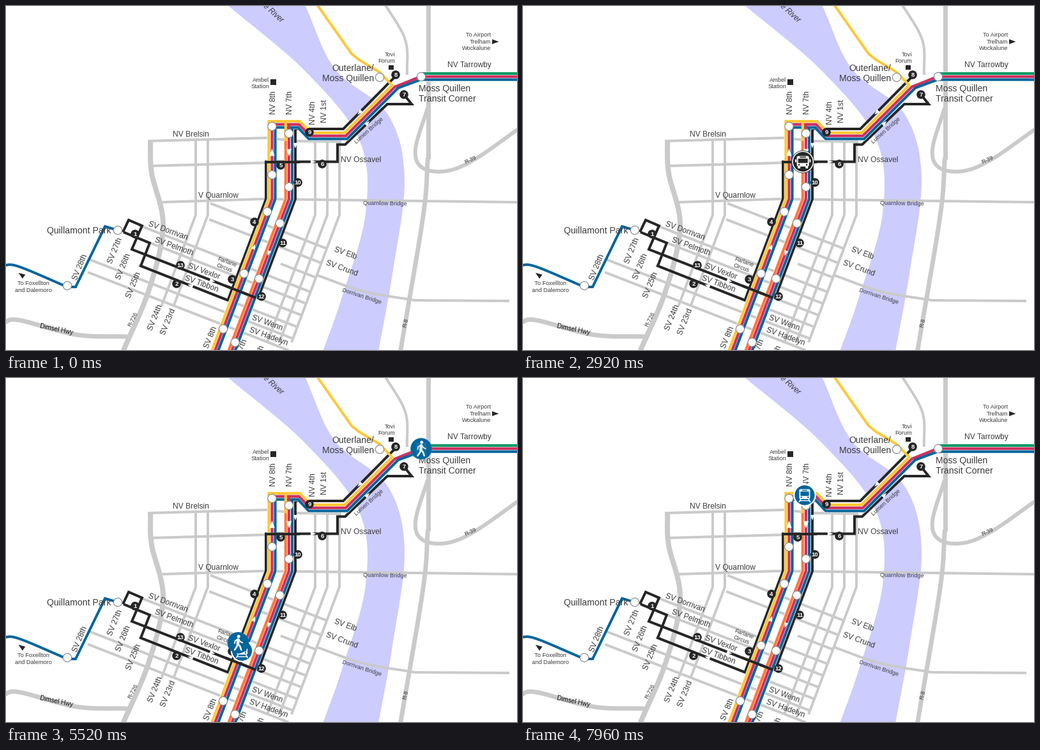
Recreate the animation shown at these times as a matplotlib script. Size 800 px wide and 540 px high, loop 8000 ms.

```python
import matplotlib.pyplot as plt
import numpy as np
from matplotlib.animation import FuncAnimation
from matplotlib.colors import to_rgb
from matplotlib.patches import Circle, FancyBboxPatch, Polygon, Rectangle
from matplotlib.transforms import Affine2D

W, H, DPI = 800, 540, 100
LOOP, STEP = 8000, 40
PX = 72 / DPI

RIVER, ROAD, INK, BLACK = "#ccccff", "#cacaca", "#3c3c3c", "#262626"
BLUE, RED, YELLOW = "#00659c", "#cf3060", "#ffc833"
ORANGE, GREEN, MIX = "#ff7a38", "#009a63", "#5d5c90"

BEND, LEAN, FALL = 303, 0.375, 0.39  # street geometry south of the bend

plt.rcParams["font.family"] = "Liberation Sans"
fig = plt.figure(figsize=(W / DPI, H / DPI), dpi=DPI, facecolor="white")
ax = fig.add_axes([0, 0, 1, 1])
ax.set_xlim(0, W)
ax.set_ylim(H, 0)
ax.axis("off")


# --- geometry
def smooth(pts, n=12):
    """Catmull-Rom curve through the points."""
    p = np.array(pts, float)
    p = np.vstack([2 * p[0] - p[1], p, 2 * p[-1] - p[-2]])
    u = np.linspace(0, 1, n, endpoint=False)[:, None]
    out = []
    for a, b, c, d in zip(p, p[1:], p[2:], p[3:]):
        out.append(0.5 * (2 * b + (c - a) * u + (2 * a - 5 * b + 4 * c - d) * u**2
                          + (3 * b - a - 3 * c + d) * u**3))
    return np.vstack(out + [p[-2:-1]])


def on_avenue(x, y, bend=BEND):
    """Point at height y on an avenue that leans west below the bend."""
    return x - LEAN * max(0, y - bend), y


def avenue(x, top, bottom, bend=BEND):
    return [(x, top), (x, bend), on_avenue(x, bottom, bend)]


def cross_y(k, x):
    """Height of the k-th cross street at x."""
    return 346 + (26 if k < 3 else 21) * (k - 3) + FALL * (x - 213)


def cross_end(k):
    """Where the k-th cross street meets the easternmost avenue."""
    x = (522 + LEAN * (328 - cross_y(k, 0))) / (1 + LEAN * FALL)
    return x, cross_y(k, x)


def travel(path, dist):
    p = np.array(path, float)
    run = np.r_[0, np.cumsum(np.hypot(*np.diff(p, axis=0).T))]
    return np.interp(dist, run, p[:, 0]), np.interp(dist, run, p[:, 1])


# --- drawing helpers
def line(pts, color=ROAD, width=4, z=2):
    p = np.array(pts, float)
    ax.plot(p[:, 0], p[:, 1], color=color, lw=width * PX, zorder=z,
            solid_capstyle="butt", solid_joinstyle="miter")


def label(text, x, y, size=12, rot=0, ha="center", color=INK, **font):
    ax.text(x, y, text, fontsize=size * PX, rotation=rot, ha=ha, va="center",
            rotation_mode="anchor", color=color, zorder=8, **font)


def block(lines, x, y, size, ha):
    for i, text in enumerate(lines):
        label(text, x, y + 1.12 * size * i, size, ha=ha)


def arrow(x, y, deg, size=4.5, color="white"):
    tri = np.array([(1, 0), (-0.9, 0.7), (-0.9, -0.7)]) * size
    spin = Affine2D().rotate_deg(deg).translate(x, y)
    ax.add_patch(Polygon(spin.transform(tri), fc=color, ec="none", zorder=7))


def arrow_on(a, b, part):
    (x0, y0), (x1, y1) = a, b
    arrow(x0 + part * (x1 - x0), y0 + part * (y1 - y0),
          np.degrees(np.arctan2(y1 - y0, x1 - x0)))


# --- river and roads
west = smooth([(346, -2), (468, 102), (553, 210), (563, 325), (525, 460), (496, 542)])
east = smooth([(468, -2), (515, 99), (597, 169), (624, 270), (605, 420), (583, 542)])
ax.add_patch(Polygon(np.vstack([west, east[::-1]]), fc=RIVER, ec="none", zorder=1))

line([(660.5, -5), (660.5, 240)], width=7)
line(smooth([(660.5, 238), (653, 330), (617, 545)]), width=7)
line(smooth([(592, -5), (625, 53), (628, 108)]))
line(smooth([(660, 160), (641, 225), (652, 254), (690, 259), (735, 240), (805, 191)]),
     width=6)
line(smooth([(226, 211), (228, 262), (246, 345), (224, 445), (182, 545)]), width=8)
line(smooth([(-5, 498), (20, 493), (110, 516), (190, 519)]), width=7)
line(smooth([(488, 423), (560, 448), (640, 462)]))
line([(640, 462), (788, 463)])

line([(222, 212), (408, 207), (455, 212), (525, 213)])
line([(228, 251), (410, 246)])
line([(243, 308), (400, 303), (800, 308)])
for x in (297, 316):
    line(avenue(x, 210, 471, 328))
for x in (484, 503, 522):
    line(avenue(x, 213, 528, 328))
for k, x in enumerate([320, 318, 430] + [208] * 4 + [128] * 2):
    line([(x, cross_y(k, x)), cross_end(k)])

# --- bus loop
south, north = on_avenue(407, 462), (407, 244.5)
bridge = [(519, 244.5), (519, 217.5), (531, 217.5), (597, 154), (635, 154)]
line([(183, 355), (192, 336), (213, 345), (197, 382), (391, 458)], BLACK, z=3)
line([(184, 355), (225, 372), (211, 408), south, (407, BEND), north]
     + bridge + [(623, 139)], BLACK, z=3)
line([(613, 107), (528, 193)] + avenue(453, 193, 460), BLACK, z=3)
line([(343, 439), (391, 458)], BLACK, z=6)
line([north, (460, 244.5)], BLACK, z=6)

# --- rail lines: parallel tracks, numbered from the outside in
GAP = 4.8


def bridge_track(k):
    y, run = 181 + GAP * k, 74 + 3 * k
    pts = avenue(411.5 + 5 * k, y, 560)[::-1]
    pts += [(460 - 1.5 * k, y), (478 - 2 * k, y + 18), (530 + 2 * k, y + 18),
            (530 + 2 * k + run, y + 18 - run)]
    return pts + (east_track(k) if k else [])


def east_track(k):
    return [(649, 106 + GAP * k), (W + 5, 106 + GAP * k)]


rails = [(c, bridge_track(k)) for k, c in enumerate([YELLOW, RED, BLUE])]
rails += [(c, avenue(437.8 + 5.1 * k, 181 + GAP * k, 560))
          for k, c in enumerate([ORANGE, RED, BLUE])]
rails.append((GREEN, east_track(0)))
for color, pts in rails:
    line(pts, "white", 5.6, 4)
for color, pts in rails:
    line(pts, color, 4.2, 5)
line([(437.8, 179), (437.8, 212)], YELLOW, 4.2, 5)
line([(485, -5), (541, 75), (552, 84), (585, 104), (606, 126)], YELLOW, z=3)
line(np.vstack([smooth([(-5, 407), (20, 409), (96, 441)]),
                [(109, 441), (155, 346), (175, 352)]]), BLUE, z=3)

# --- direction arrows, stops and numbered badges
SIXTH, FIFTH = 416.5, 443
arrow(SIXTH, 230, -90, 6)
arrow(FIFTH, 230, 90, 6)
arrow(453, 219, 90)
arrow(*on_avenue(SIXTH, 378), -70)
arrow(*on_avenue(FIFTH, 388), 110)
arrow_on(north, bridge[0], 0.66)
arrow_on((613, 107), (528, 193), 0.7)
arrow_on(bridge[2], bridge[3], 0.53)
arrow_on(south, (211, 408), 0.43)
arrow_on((197, 382), (391, 458), 0.65)

stops = [on_avenue(SIXTH, y) for y in (189, 265, 323, 420, 507)]
stops += [on_avenue(FIFTH, y) for y in (200, 284, 341, 428, 528)]
stops += [(175, 352), (96, 439), (585, 112), (650, 111)]
for spot in stops:
    ax.add_patch(Circle(spot, 6.6, fc="white", ec="#8c8c94", lw=1.2 * PX, zorder=7))

badges = [(202, 358), (267, 436), (354, 429), (389, 339), (430, 250), (495, 248),
          (623, 139), (610, 108), (475, 198), (457, 277), (433, 372), (400, 456),
          (273, 407)]
for n, (x, y) in enumerate(badges, 1):
    ax.add_patch(Circle((x, y), 6.8, fc=BLACK, ec="none", zorder=7))
    label(str(n), x, y + 0.3, 9.5, color="white", weight="bold")

# --- labels
for k, (name, x) in enumerate([("Dorrivan", 254), ("Pelmoth", 263), ("Vexlor", 310),
                               ("Tibbon", 306), ("Wenn", 409), ("Hadelyn", 411)], 3):
    label("SV " + name, x, cross_y(k, x) - 9, rot=-20)
for k, name in enumerate(["Elb", "Crund"]):
    label("SV " + name, 531 - 5 * k, cross_y(k, 531 - 5 * k) - 4, rot=-20)
for name, x, y in [("28th", 116, 410), ("27th", 171, 384), ("26th", 184, 409),
                   ("25th", 200, 438), ("24th", 234, 489), ("23rd", 254, 496),
                   ("8th", 321, 520), ("7th", 368, 540), ("4th", 395, 550)]:
    label("SV " + name, x, y, rot=68)
for name, x, y in [("8th", 419, 152), ("7th", 445, 152), ("4th", 481, 168),
                   ("1st", 499, 165)]:
    label("NV " + name, x, y, rot=90)
for text, x, y in [("NV Brelsin", 289, 202), ("NV Ossavel", 556, 242),
                   ("V Quarnlow", 332, 298), ("NV Tarrowby", 725, 93)]:
    label(text, x, y)
for text, x, y, rot in [("Quarnlow Bridge", 593, 310, -1), ("Lumen Bridge", 568, 195, 42),
                        ("Dorrivan Bridge", 557, 456, -18), ("Farlane", 346, 402, -20),
                        ("Circus", 342, 411, -20), ("R-39", 727, 242, 25),
                        ("R-8", 626, 497, 76), ("R-726", 199, 492, 63)]:
    label(text, x, y, 9.2, rot)
label("Dimsel Hwy", 79, 508, 10, -12, color="#111111")
label("e River", 418, 11, 12, -42, style="italic")

block(["Outerlane/", "Moss Quillen"], 576, 98, 14, "right")
block(["Moss Quillen", "Transit Corner"], 646, 130, 14, "left")
block(["Quillamont Park"], 164, 353, 14, "right")
block(["Tovi", "Forum"], 609, 76.5, 9.2, "right")
block(["Ambel", "Station"], 412, 116.5, 9.2, "right")
block(["To Airport", "Trelham", "Wockalune"], 759, 46, 9.2, "right")
block(["To Foxellton", "and Dalemoro"], 43, 436, 9.2, "center")

ax.add_patch(Rectangle((414, 115), 9, 9, fc=BLACK, zorder=7))
ax.add_patch(Rectangle((599, 93), 8, 7, fc=BLACK, zorder=7))
arrow(766, 56, 0, 5.5, BLACK)
arrow(24, 422, 215, 5.5, BLACK)


# --- moving icons
def box(w, h, y, color, r=0.7, x=0):
    """Rounded box centred on x with its top at y."""
    return FancyBboxPatch((x - w / 2 + r, y + r), w - 2 * r, h - 2 * r,
                          boxstyle=f"round,pad={r}", fc=color, ec="none")


def dot(x, y, r, color):
    return Circle((x, y), r, fc=color, ec="none")


def stroke(pts, width):
    return Polygon(pts, closed=False, fill=False, ec="white", lw=width * PX,
                   capstyle="round", joinstyle="round")


def bus_glyph(c):
    parts = [box(19, 16.5, -9, "white", 2.5), box(10, 1.6, -8, c), box(15.2, 7, -5, c)]
    for s in (-1, 1):
        parts += [dot(6 * s, 4.7, 1.3, c), box(4, 3.5, 7, "white", x=6 * s),
                  box(2, 5, -4, "white", x=11.2 * s)]
    return parts


def tram_glyph(c):
    parts = [box(17, 15.5, -9.5, "white", 2), box(8, 1.5, -8.3, c), box(13.4, 7, -5.8, c),
             stroke([(-7, 8.4), (7, 8.4)], 1.4)]
    for s in (-1, 1):
        parts += [dot(5.4 * s, 3.3, 1.2, c), stroke([(6.5 * s, 7), (8.5 * s, 10.5)], 1.8)]
    return parts


def walk_glyph(c):
    return [dot(0.8, -10, 2.5, "white"), stroke([(0, -5), (-0.5, 2)], 4.6),
            stroke([(-0.5, 2), (-2, 6), (-5.5, 11)], 2.6),
            stroke([(0, 2), (3, 5.5), (4.8, 11)], 2.6),
            stroke([(-1, -5.5), (-4.8, -3), (-5.5, 1)], 1.9),
            stroke([(1, -5.5), (3.5, -1.8), (7, 0)], 1.9)]


class Icon:
    def __init__(self, glyph, color, z, radius=16.8, ring=(16.2, 0)):
        self.shift = Affine2D()
        self.disc = dot(0, 0, radius, color)
        self.ring = Circle((0, 0), ring[0], fill=False, ec="white", lw=ring[1] * PX)
        self.glyph = glyph(color)
        self.parts = [self.disc, self.ring] + self.glyph
        for i, part in enumerate(self.parts):
            part.set_transform(self.shift + ax.transData)
            part.set_zorder(z + i / 100)
            ax.add_artist(part)

    def place(self, pos, alpha, glyph=None):
        self.shift.clear().translate(*pos)
        for part in self.parts:
            part.set_alpha(alpha)
            part.set_visible(alpha > 0 or bool(glyph))
        if glyph is not None:
            for part in self.glyph:
                part.set_alpha(glyph)


def ramp(t, a, b):
    return float(np.clip((t - a) / (b - a), 0, 1))


def blend(a, b, k):
    return tuple((1 - k) * np.array(to_rgb(a)) + k * np.array(to_rgb(b)))


HOME, BOARD, QUAY, EAST = (345, 407), (353, 430), (625, 136), (650, 111)
PLATFORM = on_avenue(SIXTH, 420)
BUS_WAY = [BOARD, (402, 297), (407, 283), north] + bridge[:-1] + [(633, 154), QUAY]
ARRIVE = [on_avenue(SIXTH, 563), PLATFORM]
DEPART = [PLATFORM, (SIXTH, BEND), (SIXTH, 184), (441, 184)]

rider = Icon(walk_glyph, BLACK, 20)
bus = Icon(bus_glyph, BLACK, 21, 17.8, (16.2, 1.5))
tram = Icon(tram_glyph, BLUE, 22, 16, (16.7, 2.2))
walker = Icon(walk_glyph, BLUE, 23)
changer = Icon(walk_glyph, BLUE, 24)
tram_east = Icon(tram_glyph, BLUE, 25, 16, (16.7, 2.2))


def walk(a, b, k):
    return a[0] + k * (b[0] - a[0]), a[1] + k * (b[1] - a[1])


def update(i):
    t = i * STEP

    # walk to the stop, become the bus and ride
    swap = ramp(t, 840, 1240)
    rider.place(walk(HOME, BOARD, ramp(t, 600, 840)), ramp(t, 0, 240) * (swap < 1))
    turn, gone = ramp(t, 4800, 5040), ramp(t, 4920, 5040)
    bus.disc.set_facecolor(blend(BLACK, MIX, min(1, 2 * turn)))
    bus.place(travel(BUS_WAY, 0.164 * (t - 1540)), swap * (gone < 1), swap * (1 - turn))

    # change to the eastbound tram
    aboard = ramp(t, 5500, 5760)
    changer.place(walk(QUAY, EAST, ramp(t, 5120, 5500)), gone * (aboard < 1),
                  turn * (aboard < 1))
    tram_east.place(travel([EAST, (850, 111)], 0.16 * (t - 5800)), aboard)

    # second walker meets the northbound tram
    if t < 6380:
        spot = travel(ARRIVE, 0.16 * (t - 4620))
    else:
        spot = travel(DEPART, 0.17 * (t - 6380))
    tram.place(spot, float(t >= 4620))
    walker.place(walk(HOME, PLATFORM, ramp(t, 5200, 5680)),
                 ramp(t, 4560, 4760) * (1 - ramp(t, 5680, 5920)))
    return []


anim = FuncAnimation(fig, update, frames=LOOP // STEP, interval=STEP,
                     init_func=lambda: update(0), repeat=True, repeat_delay=0)
plt.show()
```
